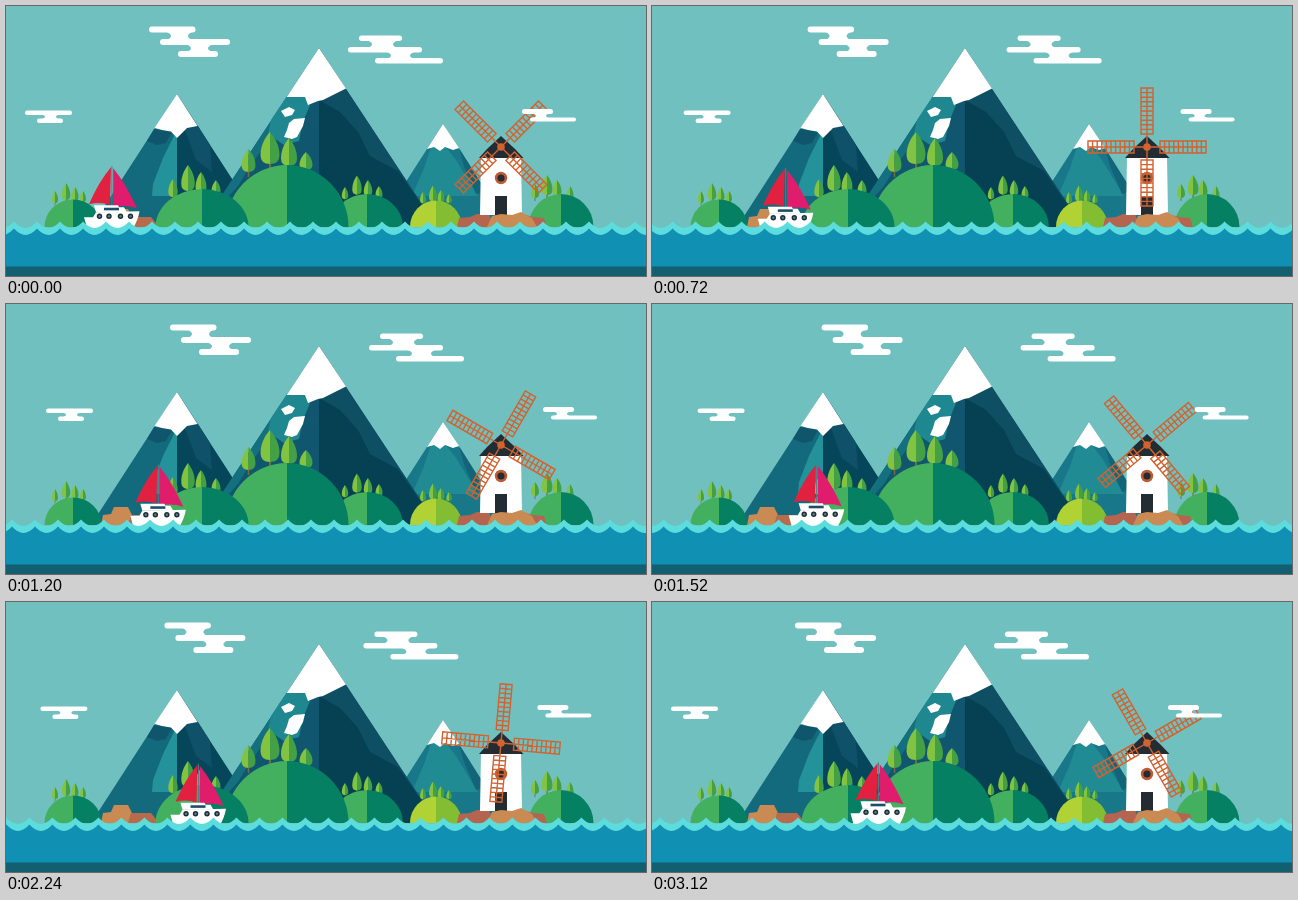
Animation of 640 by 270 pixels, one loop 3.2 s. Source, as an HTML page with a canvas:

```html
<!DOCTYPE html>
<html lang="en">
<head>
<meta charset="utf-8">
<title>Sailing past the windmill</title>
<style>
html, body { margin: 0; width: 100%; height: 100%; overflow: hidden; background: #70c0c0; }
canvas { display: block; width: 640px; height: 270px; }
</style>
</head>
<body>
<canvas id="stage" width="640" height="270"></canvas>
<script>
const ctx = document.getElementById('stage').getContext('2d');
const LOOP = 3200, STEP = 80, LAST = LOOP - STEP;
const GREEN = '#43b05f', DEEP = '#058062', ORANGE = '#d2622f', INK = '#232c32';

function fill(color, path) {
  ctx.fillStyle = color;
  ctx.fill(new Path2D(path));
}

function rect(color, x, y, w, h) {
  ctx.fillStyle = color;
  ctx.fillRect(x, y, w, h);
}

function disc(color, x, y, r) {
  ctx.fillStyle = color;
  ctx.beginPath();
  ctx.arc(x, y, r, 0, Math.PI * 2);
  ctx.fill();
}

function pill(x1, x2, y, h) {
  ctx.fillStyle = '#fff';
  ctx.beginPath();
  ctx.roundRect(x1, y, x2 - x1, h, h / 2);
  ctx.fill();
}

// Bridge with hollow sides between two pills
function neck(x1, x2, y1, y2) {
  const m = (y1 + y2) / 2, c = 4;
  fill('#fff', `M${x1 - c} ${y1}Q${x1 + c} ${m} ${x1 - c} ${y2}H${x2 + c}Q${x2 - c} ${m} ${x2 + c} ${y1}Z`);
}

function clouds() {
  pill(143, 189.5, 20.5, 6);
  pill(154, 224, 33, 6);
  pill(172, 212, 45, 6);
  neck(165, 182, 26, 34);
  neck(185, 202, 38.5, 46);

  pill(353, 396, 29.5, 5.5);
  pill(342, 416, 41, 5.5);
  pill(369, 437, 52, 5.5);
  neck(366, 387, 34.5, 42);
  neck(385, 404, 46, 53);

  pill(19, 66, 104.5, 4.5);
  pill(31, 57, 112.5, 4.5);
  neck(39, 50, 108, 113.5);

  pill(516, 547, 103, 5);
  pill(524, 570, 111.5, 4);
  neck(530, 540, 107, 112.5);
}

function mountains() {
  // left
  fill('#136a7c', 'M171 88L85 221H257Z');
  fill('#05465a', 'M171 88V221H257Z');
  fill('#0e5168', 'M178 122L192 120L204 139L206 166L190 154Z');
  fill('#24929a', 'M169 128L171 132V190H146L147 178L157 152Z');
  fill('#0f566c', 'M148 123L166 126L160 137L151 139L141 135Z');
  fill('#fff', 'M171 88L148.5 122L156 124L165 125.5L171 132L178 125L181 122L191.5 120Z');

  // right
  fill('#187788', 'M437 118L371 221H503Z');
  fill('#208b93', 'M425 141L440 141L450 154L472 190H406L418 162Z');
  fill('#126478', 'M453 142L480 185L470 188L458 160Z');
  fill('#fff', 'M437 118L421 143L428 141L434 145L439 141L447 144L453 142Z');

  // centre
  fill('#10566f', 'M313 42L195 221H431Z');
  fill('#0f4f63', 'M313 42V221H431Z');
  fill('#054053', 'M313 94L334 106L352 126L364 150L392 165L431 221H313Z');
  fill('#14707f', 'M276 98L266 130L244 160L232 180L195 221Z');
  fill('#1f8790', 'M281 90H302L304 99L297 116L293 135L278 139L262 128L265 114Z');
  fill('#fff', 'M313 42L280.7 91L299 91L302 99L307 97L312 95L317 94L340 82.5Z');
  fill('#fff', 'M275 105L283 101L289 104L286 109L279 111Z');
  fill('#fff', 'M283 117L288 113L299 112L297 120L291 131L286 133L278 131L281 124Z');
}

function hill(x, rx, ry, light = GREEN, dark = DEEP) {
  const top = 221 - ry;
  fill(light, `M${x - rx} 221A${rx} ${ry} 0 0 1 ${x} ${top}V221Z`);
  fill(dark, `M${x} ${top}A${rx} ${ry} 0 0 1 ${x + rx} 221H${x}Z`);
}

function tree([x, top, h, w]) {
  const b = top + h, low = top + h * .72, r = w / 2;
  const half = s => `M${x} ${top}C${x + s * r * .6} ${top + h * .2} ${x + s * r} ${top + h * .45} ${x + s * r} ${low}` +
    `Q${x + s * r} ${b} ${x} ${b}Z`;
  rect('#7a6a3a', x - w / 18, b - h * .3, w / 9, h * .52);
  fill('#82c341', half(-1));
  fill('#43a045', half(1));
}

function hills() {
  [[49, 185, 12, 6], [60, 177, 17, 8.5], [69, 181, 14, 7], [77, 185, 11, 6],
   [167, 173, 18, 9.5], [182, 159, 26, 13.5], [195, 166, 21, 11], [210, 174, 15, 9],
   [339, 181, 12, 6.5], [351, 169.5, 19, 9.5], [362, 174, 16, 8.5], [373, 180, 12, 7],
   [242.5, 143, 23, 14], [264, 126, 32, 19], [283, 132, 28, 16], [300, 146, 18, 13],
   [417, 186, 11, 6], [427, 179.5, 16, 8], [435, 184, 12, 7], [443, 188, 9, 5.5],
   [529, 178, 14, 8], [541, 169, 20, 11], [551, 174, 16, 9], [564, 180, 13, 7]].forEach(tree);
  hill(67, 28.5, 27.5);
  hill(361, 36, 33);
  hill(281, 61.5, 62);
  hill(196, 46.5, 38);
  hill(430, 26, 26.5, '#b1d235', '#83bd32');
  hill(555, 32.5, 33);
}

function rocks() {
  fill('#c98a53', 'M95 221L97 211L105 210L108 203H122L126 211L130 221Z');
  fill('#b76a4c', 'M122 221L125 211H145L150 217V221Z');
  fill('#b5644f', 'M451 221L453 212L464 211L471 208H483L488 221Z');
  fill('#b5644f', 'M508 221L513 207L527 211L538 212L541 221Z');
}

function mill() {
  fill('#fff', 'M475 151H515L516 209H474Z');
  rect(INK, 489, 190, 12, 19);
  disc('#bf5a34', 495, 172, 6.2);
  disc(INK, 495, 172, 3.6);
  fill(INK, 'M473 152L481 143L495 130L509 143L517.5 152Z');
  fill('#c98a53', 'M481 221L486 210L495 208L506 209L515 206L526 212L531 221Z');
}

function blades(angle) {
  ctx.save();
  ctx.translate(495, 141);
  ctx.rotate(angle * Math.PI / 180);
  ctx.strokeStyle = ORANGE;
  ctx.lineWidth = 1.4;
  for (let i = 0; i < 4; i++) {
    ctx.beginPath();
    ctx.rect(-6, -59, 12, 46);
    for (let y = 17.6; y < 58; y += 4.6) {
      ctx.moveTo(-6, -y);
      ctx.lineTo(6, -y);
    }
    ctx.moveTo(0, 0);
    ctx.lineTo(0, -59);
    ctx.stroke();
    ctx.rotate(Math.PI / 2);
  }
  ctx.restore();
  disc(ORANGE, 495, 141, 3.8);
}

function boat(x, y) {
  ctx.save();
  ctx.translate(x, y);
  rect('#4f7f86', 27.4, 0, 1, 42);
  fill('#e2203f', 'M27 1Q15 15 5 38Q17 35 26 39Z');
  fill('#e01d6c', 'M29.2 2Q41 16 53 42Q41 38 29.2 41Z');
  fill('#fff', 'M10 39H34L35 41H40L43 46H12Z');
  fill('#fff', 'M0 51H9L12 46L55.5 45Q54 54 49 62H3Z');
  rect('#1d4e66', 20, 41.5, 15, 2.6);
  for (const px of [15.5, 25, 36.5, 46.5]) {
    disc(INK, px, 50, 2.7);
    disc('#4c8298', px, 50, 1.2);
  }
  ctx.restore();
}

function sea(shift) {
  const p = 23;
  const scallops = top => {
    let d = `M${shift + 8 - 2 * p} ${top}`;
    for (let i = 0; i < 31; i++) d += `q${p / 2} 13 ${p} 0`;
    return d + 'V270H-60Z';
  };
  fill('#5ddcdd', scallops(215.5));
  fill('#1090b3', scallops(222.5));
  rect('#125f70', 0, 260.5, 640, 9.5);
}

function draw(now) {
  const t = Math.floor(now % LOOP / STEP) * STEP;
  const half = LAST / 2;
  const sway = 27.3 * (1 - Math.abs(t - half) / half);
  rect('#70c0c0', 0, 0, 640, 270);
  mountains();
  hills();
  rocks();
  mill();
  blades(t / 16 - 45);
  ctx.save();
  ctx.translate(sway, 0);
  clouds();
  ctx.restore();
  boat(78 + 120.5 * t / LAST, 161 + .8 * Math.cos((t - 720) / 1600 * Math.PI * 2));
  sea(sway);
}

const start = performance.now();
function tick() {
  draw(performance.now() - start);
  requestAnimationFrame(tick);
}
tick();
</script>
</body>
</html>
```
